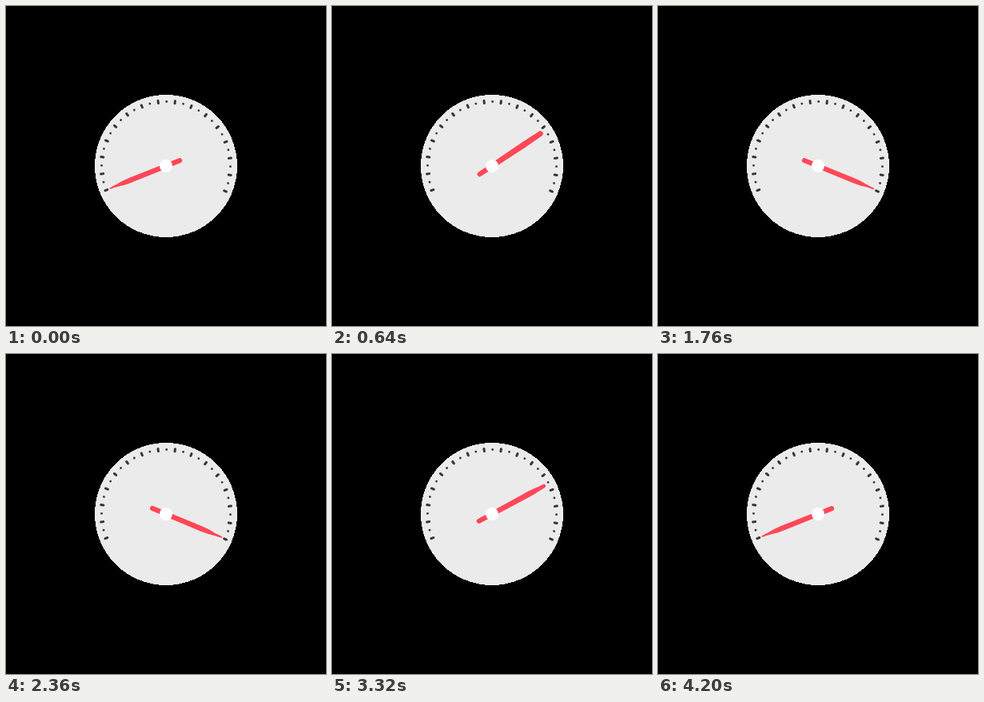
Write an HTML page that moves like this. It is 400 px wide and 400 px high and loops after 5000 ms.

```html
<!DOCTYPE html>
<html lang="en">
<head>
<meta charset="utf-8">
<title>Gauge</title>
<style>
  html, body { margin: 0; width: 100%; height: 100%; overflow: hidden; background: #000; }
  svg { display: block; width: 100vw; height: 100vh; }
</style>
</head>
<body>
<svg viewBox="0 0 400 400">
  <rect width="400" height="400"/>
  <g transform="translate(200 200)">
    <circle r="89" fill="#ebebeb" shape-rendering="crispEdges"/>
    <g id="scale" stroke="#353535" stroke-width="3" stroke-linecap="round" fill="#353535"></g>
    <path id="needle" fill="#ff4757"/>
    <circle r="8" fill="#fff"/>
  </g>
</svg>
<script>
const LOOP = 5000;
const LOW = -111.8, HIGH = 112.2;
const RISE = { start: 0, length: 1200, x1: 0.735, x2: 0.156 };
const FALL = { start: 2772, length: 1291, x1: 0.58, x2: 0.707 };

const scale = document.getElementById('scale');
const needle = document.getElementById('needle');

function addMark(tag, angle, attributes) {
  const mark = document.createElementNS('http://www.w3.org/2000/svg', tag);
  mark.setAttribute('transform', `rotate(${angle})`);
  for (const key in attributes) mark.setAttribute(key, attributes[key]);
  scale.append(mark);
}

for (let i = 0; i < 31; i++) {
  const angle = -112 + i * 7.5;
  if (i % 2) addMark('circle', angle, { cy: -80.5, r: 1.4, stroke: 'none' });
  else addMark('line', angle, { y1: -82, y2: -79 });
}

// Cubic Bezier easing with flat ends: solve x(s) = u by bisection.
function ease(time, { start, length, x1, x2 }) {
  const u = Math.min(1, Math.max(0, (time - start) / length));
  let low = 0, high = 1;
  for (let i = 0; i < 30; i++) {
    const s = (low + high) / 2, r = 1 - s;
    if (3 * s * r * r * x1 + 3 * s * s * r * x2 + s ** 3 < u) low = s;
    else high = s;
  }
  const s = (low + high) / 2;
  return s * s * (3 - 2 * s);
}

function sweepAt(time) {
  return LOW + (HIGH - LOW) * (ease(time, RISE) - ease(time, FALL));
}

function trembleAt(time) {
  const holding = time > 1200 && time < FALL.start;
  return holding ? 0.4 * Math.sin((time - 1200) * Math.PI / 80) : 0;
}

// The tip broadens while the needle moves fast.
function needlePath(speed) {
  const spread = Math.min(2.3, speed * 6);
  const tip = 1.1 + spread;
  const body = 3.2 + spread * 0.25;
  return `M-3 18.5 L${-body} -48 C${-body} -60 ${-tip} -66 ${-tip} -72.5
    Q${-tip} -76 0 -76 Q${tip} -76 ${tip} -72.5
    C${tip} -66 ${body} -60 ${body} -48 L3 18.5 Q3 21.5 0 21.5 Q-3 21.5 -3 18.5Z`;
}

function render(time) {
  const speed = Math.abs(sweepAt(time + 4) - sweepAt(time - 4)) / 8;
  needle.setAttribute('d', needlePath(speed));
  needle.setAttribute('transform', `rotate(${sweepAt(time) + trembleAt(time)})`);
}

const begin = performance.now();
function tick() {
  const time = (performance.now() - begin) % LOOP;
  render(Math.floor(time / 40) * 40);
  requestAnimationFrame(tick);
}
tick();
</script>
</body>
</html>
```
